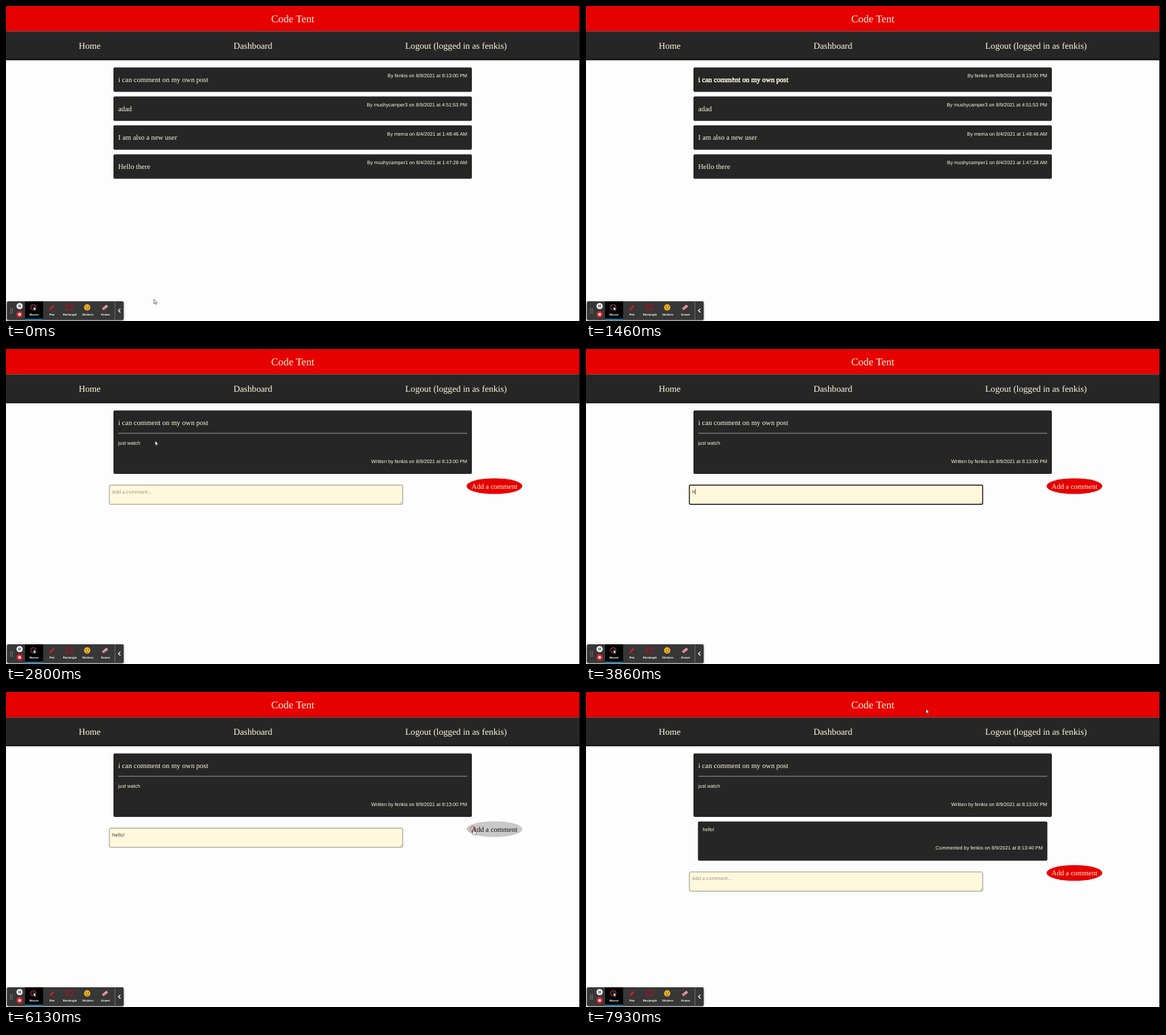
Animation, 844 px wide and 464 px high, one loop 8000 ms. Source, as an HTML page with a canvas:

```html
<!DOCTYPE html>
<html lang="en">
<head>
<meta charset="utf-8">
<title>Blog walkthrough</title>
<style>
html, body { margin: 0; width: 100%; height: 100%; overflow: hidden; background: #fdfdfd; }
canvas { display: block; width: 844px; height: 464px; }
</style>
</head>
<body>
<canvas id="stage" width="844" height="464"></canvas>
<script>
const ctx = document.getElementById('stage').getContext('2d');
const LOOP = 8000;
const CREAM = '#fff8dc', DARK = '#262626', RED = '#e60000';
const SERIF = '"Liberation Serif", "Times New Roman", serif';
const SANS = '"Liberation Sans", Arial, sans-serif';
const FORM = '"Open Sans", sans-serif';
const USER = 'fenkis';

const POST_OPEN = 2400, FOCUS = 3100, BLUR = 6080, COMMENTED = 7480;
const CLICKS = [1980, FOCUS, BLUR];
const KEYS = [3860, 4000, 4130, 4260, 4400, 4930];
const PATH = [
  [60, 217.5, 432], [800, 213, 179.5], [1250, 215, 104], [2660, 215, 104],
  [3060, 230, 214], [5000, 230, 214], [5330, 529, 201], [5420, 529, 201],
  [5950, 687, 201.5], [7450, 687, 201.5], [7910, 500, 25]
];
const POSTS = [
  ['i can comment on my own post', USER, '8/9/2021 at 8:13:00 PM'],
  ['adad', 'mushycamper3', '8/9/2021 at 4:51:53 PM'],
  ['I am also a new user', 'mema', '8/4/2021 at 1:48:46 AM'],
  ['Hello there', 'mushycamper1', '8/4/2021 at 1:47:28 AM']
];

function text(str, x, y, size, family, color, align = 'left') {
  ctx.font = `${size}px ${family}`;
  ctx.textAlign = align;
  ctx.fillStyle = color;
  ctx.fillText(str, x, y);
}

function rect(x, y, w, h, color) {
  ctx.fillStyle = color;
  ctx.fillRect(x, y, w, h);
}

function rounded(x, y, w, h, r, fill, stroke, width = 1) {
  ctx.beginPath();
  ctx.roundRect(x, y, w, h, r);
  if (fill) { ctx.fillStyle = fill; ctx.fill(); }
  if (stroke) { ctx.strokeStyle = stroke; ctx.lineWidth = width; ctx.stroke(); }
}

function disc(x, y, r, fill) {
  ctx.beginPath();
  ctx.arc(x, y, r, 0, Math.PI * 2);
  ctx.fillStyle = fill;
  ctx.fill();
}

function ring(x, y, r, color, width) {
  ctx.beginPath();
  ctx.arc(x, y, r, 0, Math.PI * 2);
  ctx.strokeStyle = color;
  ctx.lineWidth = width;
  ctx.stroke();
}

function line(points, color, width) {
  ctx.beginPath();
  points.forEach(([x, y]) => ctx.lineTo(x, y));
  ctx.strokeStyle = color;
  ctx.lineWidth = width;
  ctx.stroke();
}

function pointerAt(t) {
  const i = PATH.findIndex(p => p[0] > t);
  if (i === 0) return PATH[0].slice(1);
  if (i < 0) return PATH[PATH.length - 1].slice(1);
  const [t0, x0, y0] = PATH[i - 1], [t1, x1, y1] = PATH[i];
  const u = (t - t0) / (t1 - t0), k = u * u * (3 - 2 * u);
  return [x0 + (x1 - x0) * k, y0 + (y1 - y0) * k];
}

const pointerShown = t => t < 2130 || (t >= 2660 && t < 3820) || t >= 5000;

function drawHeader() {
  rect(0, 0, 844, 464, '#fdfdfd');
  rect(0, 0, 844, 37.3, RED);
  rect(0, 37.3, 844, 42.7, DARK);
  rect(0, 76, 844, 4, '#202020');
  text('Code Tent', 421.7, 23.6, 15.45, SERIF, CREAM, 'center');
  text('Home', 123, 63, 13.19, SERIF, CREAM, 'center');
  text('Dashboard', 363, 63, 13.19, SERIF, CREAM, 'center');
  text(`Logout (logged in as ${USER})`, 661.7, 63, 13.19, SERIF, CREAM, 'center');
}

function drawList(x, y) {
  POSTS.forEach(([title, user, date], i) => {
    const top = 90.6 + i * 42.6;
    rounded(158, top, 527, 36, 2, DARK);
    text(title, 165, top + 21.6, 10.55, SERIF, CREAM);
    if (x > 158 && x < 685 && y > top && y < top + 36) {
      ctx.strokeStyle = CREAM;
      ctx.lineWidth = 0.5;
      ctx.strokeText(title, 165, top + 21.6);
    }
    text(`By ${user} on ${date}`, 678, top + 14.8, 7.25, SANS, CREAM, 'right');
  });
}

function drawForm(t, top, x, y) {
  const focused = t >= FOCUS && t < BLUR;
  const typed = t < COMMENTED ? 'hello!'.slice(0, KEYS.filter(k => t >= k).length) : '';
  rounded(152, top + 0.5, 431.3, 28.3, 1.5, CREAM, focused ? '#1a1a1a' : '#8c897d', focused ? 1.4 : 0.9);
  line([[579.5, top + 27.5], [582.3, top + 24.7]], '#77756c', 0.6);
  line([[581.3, top + 27.5], [582.3, top + 26.5]], '#77756c', 0.6);
  text(typed || 'Add a comment...', 156, top + 12.5, 7.1, FORM, typed ? '#2b2b2b' : '#8f8c80');
  if (focused) {
    const lastKey = Math.max(FOCUS, ...KEYS.filter(k => t >= k));
    if ((t - lastKey) % 1000 < 520) {
      rect(156.2 + (typed ? ctx.measureText(typed).width : 0), top + 6, 0.7, 8, '#111');
    }
  }

  const cy = top + 2;
  const over = ((x - 718.2) / 41) ** 2 + ((y - cy) / 11.5) ** 2 < 1;
  ctx.beginPath();
  ctx.ellipse(718.2, cy, 41, 11.6, 0, 0, Math.PI * 2);
  ctx.fillStyle = over ? '#c8c8c8' : RED;
  ctx.fill();
  text('Add a comment', 718.2, cy + 3.6, 10.55, SERIF, over ? '#111' : CREAM, 'center');
  return over ? 'hand' : x > 152 && x < 583 && y > top + 2 && y < top + 28 ? 'beam' : 'arrow';
}

function drawPost(t, x, y) {
  const [title, user, date] = POSTS[0];
  rounded(158, 90.6, 527, 93.4, 2, DARK);
  text(title, 165, 112.2, 10.55, SERIF, CREAM);
  rect(165, 123.7, 513, 0.8, '#b5b2a2');
  text('just watch', 165, 141, 7.25, SANS, CREAM);
  text(`Written by ${user} on ${date}`, 678, 167.7, 7.25, SANS, CREAM, 'right');
  if (t < COMMENTED) return drawForm(t, 200, x, y);
  rounded(164.6, 190.8, 513.8, 57.7, 2, DARK);
  text('hello!', 171.5, 205.4, 7.25, SANS, CREAM);
  text(`Commented by ${USER} on 8/9/2021 at 8:13:40 PM`, 671.7, 232.2, 7.25, SANS, CREAM, 'right');
  return drawForm(t, 264.5, x, y);
}

function drawArrow(x, y, s = 1) {
  ctx.save();
  ctx.translate(x, y);
  ctx.scale(s, s);
  ctx.beginPath();
  [[0, 0], [0, 6.6], [1.5, 5.2], [2.5, 7.5], [3.6, 7], [2.6, 4.8], [4.7, 4.7]]
    .forEach(([px, py]) => ctx.lineTo(px, py));
  ctx.closePath();
  ctx.fillStyle = '#fff';
  ctx.fill();
  ctx.strokeStyle = '#222';
  ctx.lineWidth = 0.6;
  ctx.stroke();
  ctx.restore();
}

function drawHand(x, y) {
  rounded(x - 2, y + 4, 5.6, 4.6, 1.5, '#fff', '#222', 0.6);
  rounded(x - 0.8, y, 1.7, 6, 0.8, '#fff', '#222', 0.6);
  rect(x - 0.5, y + 3.6, 1.1, 3, '#fff');
}

function drawPointer(t, x, y, kind) {
  for (const c of CLICKS) {
    if (t >= c && t < c + 260) ring(x, y + 0.5, 4.2, '#e0303a', 0.8);
  }
  if (kind === 'hand') drawHand(x + 0.8, y);
  else if (kind === 'beam') {
    line([[x, y - 4], [x, y + 4]], '#222', 0.7);
    line([[x - 1.2, y - 4], [x + 1.2, y - 4]], '#222', 0.6);
    line([[x - 1.2, y + 4], [x + 1.2, y + 4]], '#222', 0.6);
  } else drawArrow(x, y);
}

function drawToolbar() {
  ctx.save();
  ctx.shadowColor = 'rgba(0,0,0,.55)';
  ctx.shadowBlur = 3;
  ctx.shadowOffsetY = 1;
  rounded(1.3, 435, 171.7, 27.5, 2, '#373737');
  ctx.restore();

  for (let i = 0; i < 8; i++) disc(6.8 + (i % 2) * 2.4, 446 + (i >> 1) * 2.1, 0.55, '#c4c4c4');
  disc(20, 442, 4.6, '#f4f4f4');
  rect(18.4, 440, 1.1, 4, '#333');
  rect(20.6, 440, 1.1, 4, '#333');
  disc(20, 454.3, 4.6, '#e2202c');
  rounded(18.2, 452.5, 3.6, 3.6, 0.5, '#fff');

  rect(28, 435, 26.5, 27.5, '#000');
  rect(28, 460.8, 26.5, 1.5, '#1b9fe0');
  ring(40.2, 443.8, 3.9, '#e45460', 0.9);
  drawArrow(40.6, 442.8, 0.85);

  line([[64.8, 447], [70.3, 441.2]], '#e0182c', 2.3);
  line([[63.7, 448.4], [65.2, 446.8]], '#e0182c', 0.9);

  ctx.strokeStyle = '#d0061c';
  ctx.lineWidth = 0.9;
  ctx.strokeRect(89.2, 440.7, 8, 6.6);
  for (const px of [89.2, 97.2]) for (const py of [440.7, 447.3]) rect(px - 0.9, py - 0.9, 1.8, 1.8, '#d0061c');

  disc(119.4, 444, 4.7, '#f3b324');
  disc(117.8, 443, 0.75, '#4a3210');
  disc(121.2, 443, 0.75, '#4a3210');
  line([[117.3, 445.5], [119.4, 446.7], [121.5, 445.5]], '#6b4312', 0.8);

  ctx.save();
  ctx.translate(145.6, 444);
  ctx.rotate(-0.68);
  rounded(-4.4, -2, 8.8, 4, 0.8, '#e5959d');
  rect(-2, -2, 0.8, 4, '#a85c68');
  ctx.restore();

  ['Mouse', 'Pen', 'Rectangle', 'Stickers', 'Eraser'].forEach((label, i) =>
    text(label, 41.2 + i * 26.35, 455.8, '700 4.25', SANS, '#fff', 'center'));
  rect(159.7, 435.5, 0.9, 26.5, '#777');
  line([[168.2, 445.9], [165.4, 448.7], [168.2, 451.5]], '#fff', 1.2);
}

function draw(t) {
  const [x, y] = pointerAt(t);
  ctx.textRendering = 'geometricPrecision';
  drawHeader();
  let kind = 'arrow';
  if (t < POST_OPEN) drawList(x, y);
  else kind = drawPost(t, x, y);
  rect(843, 0, 1, 464, '#111');
  drawToolbar();
  if (pointerShown(t)) drawPointer(t, x, y, kind);
}

const start = performance.now();
function tick() {
  draw((performance.now() - start) % LOOP);
  requestAnimationFrame(tick);
}
tick();
</script>
</body>
</html>
```
